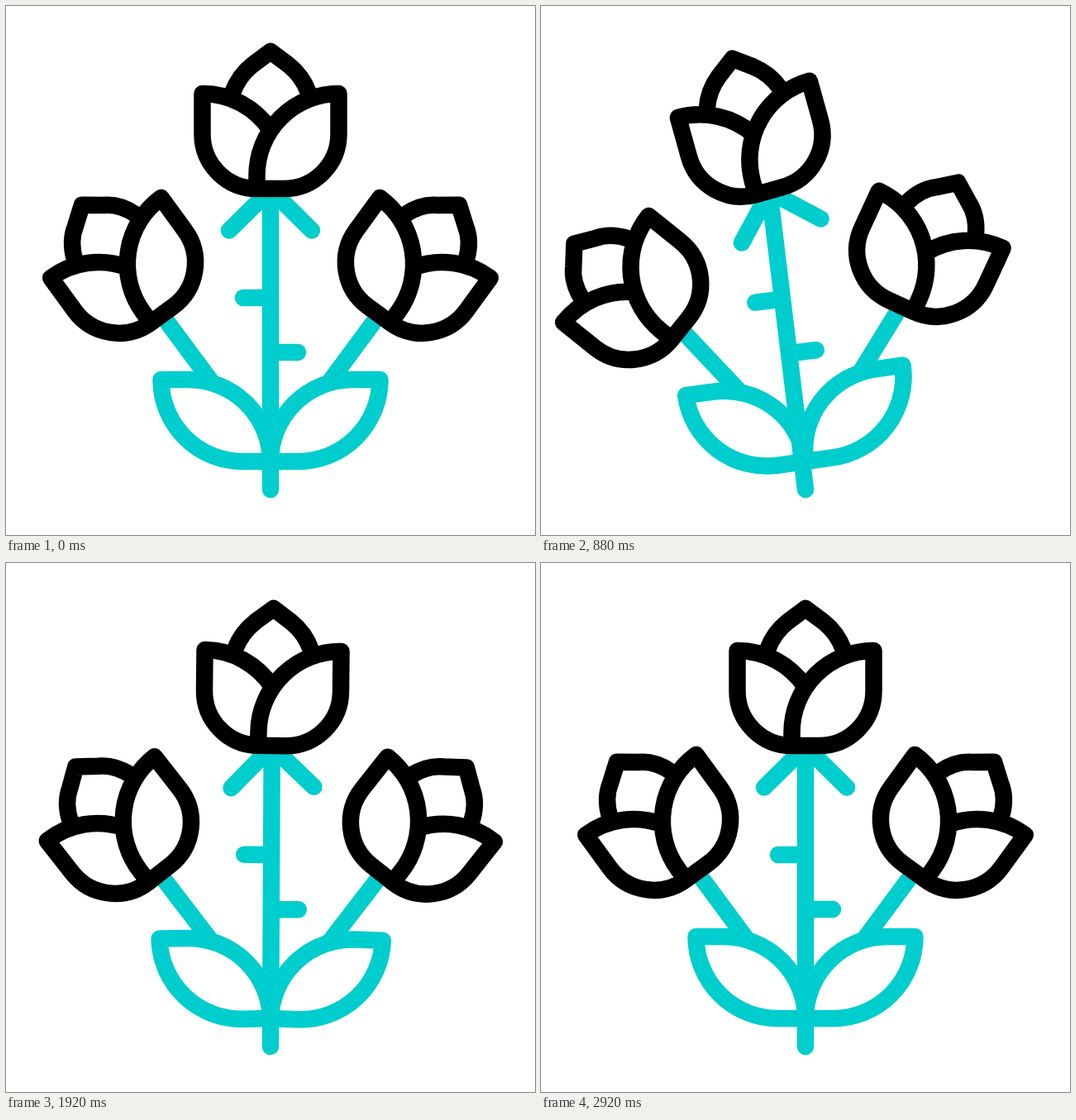
An HTML page with a canvas that plays this animation: 640 px wide and 640 px high, repeating every 3.08 s.

```html
<!DOCTYPE html>
<html lang="en">
<head>
<meta charset="utf-8">
<title>Swaying flowers</title>
<style>
  html, body { margin: 0; width: 100%; height: 100%; overflow: hidden; background: #fff; }
  canvas { display: block; width: 100vw; height: 100vh; }
</style>
</head>
<body>
<canvas id="stage"></canvas>
<script>
const LOOP = 3080, STEP = 40, LAST = 73;
const TEAL = '#00cdcd', BLACK = '#000', WHITE = '#fff';

// Peak angles in degrees; each swing starts and ends at rest.
const STEM = [0, 7.2, -7.2, 3.05, -3.05, 1.2, -0.15, 0];
const HEAD = [0, 9, -9, 3.85, -3.85, 1.5, -0.2, 0];
const SEPAL = [0, 10, -10, 4.8, -4.8, 1, -0.3, 0];
const LEAF = [0, 10, -10, 5, -2.8, 2, 0];

const canvas = document.getElementById('stage');
const ctx = canvas.getContext('2d');
const scale = window.devicePixelRatio || 1;
canvas.width = canvas.height = 640 * scale;

// Flower of the given height with its base at the origin
function bloom(height) {
  const shoulder = 16 - height;
  return new Path2D(
    'M-82.5 -115 V-66 A66 66 0 0 0 -16.5 0 H16.5 A66 66 0 0 0 82.5 -66 V-115' +
    'A99 99 0 0 0 -16.5 -16 V0' +
    'M-82.5 -115 A99 99 0 0 1 0 -70.7' +
    `M-46 -116 C-41 -130 -33 -141 -21.5 ${shoulder} L0 ${-height}` +
    `L21.5 ${shoulder} C33 -141 41 -130 46 -116`);
}

// Right-hand leaf with its base at the origin
const leaf = new Path2D('M0 0 H33 A99 99 0 0 0 132.5 -99 H99 A99 99 0 0 0 0 0 Z');
const trunk = new Path2D('M0 0 V-363 M-33 -232 H0 M0 -166 H33');
const sideStem = new Path2D('M0 0 L131.5 -177.5');
const sepals = new Path2D('M-50 49.5 L0 0 L50 49.5');
const tallBloom = bloom(166), sideBloom = bloom(164.2);

// Damped swing: first peak after 9 steps, then one every 10
function swing(step, delay, peaks) {
  const tau = step - delay;
  if (tau <= 0) return 0;
  const i = tau < 9 ? 0 : 1 + Math.floor((tau - 9) / 10);
  if (i >= peaks.length - 1) return 0;
  const u = i === 0 ? tau / 9 : (tau - 9) % 10 / 10;
  return peaks[i] + (peaks[i + 1] - peaks[i]) * u * u * (3 - 2 * u);
}

function at(x, y, deg, draw, flip = 1) {
  ctx.save();
  ctx.translate(x, y);
  ctx.rotate(deg * Math.PI / 180);
  ctx.scale(flip, 1);
  draw();
  ctx.restore();
}

function line(path, color) {
  ctx.strokeStyle = color;
  ctx.stroke(path);
}

function drawLeaf() {
  ctx.fillStyle = WHITE;
  ctx.fill(leaf);
  line(leaf, TEAL);
}

const flowers = [
  { y: 551, side: 1, delay: 0, jx: 131.5, jy: -177.5, path: sideBloom },
  { y: 551, side: -1, delay: 4, jx: -131.5, jy: -177.5, path: sideBloom },
  { y: 585, side: 0, delay: 2, jx: 0, jy: -364, path: tallBloom }
];

function drawBloom(f, step) {
  const sway = swing(step, f.delay, STEM);
  const nod = swing(step, f.delay, HEAD);
  at(320, f.y, sway, () =>
    at(f.jx, f.jy, nod + 36 * f.side, () => line(f.path, BLACK), f.side > 0 ? -1 : 1));
}

function render(step) {
  ctx.setTransform(scale, 0, 0, scale, 0, 0);
  ctx.fillStyle = WHITE;
  ctx.fillRect(0, 0, 640, 640);
  ctx.lineWidth = 20.5;
  ctx.lineCap = ctx.lineJoin = 'round';

  for (const f of flowers) {
    if (f.side) at(320, f.y, swing(step, f.delay, STEM), () => line(sideStem, TEAL), f.side);
  }
  at(320, 551, -swing(step, 11, LEAF), drawLeaf);
  at(320, 551, swing(step, 5, LEAF), drawLeaf, -1);

  at(320, 585, swing(step, 2, STEM), () => {
    line(trunk, TEAL);
    at(0, -363, swing(step, 3, SEPAL), () => line(sepals, TEAL));
  });

  for (const f of flowers) drawBloom(f, step);
}

const start = performance.now();
function tick() {
  const t = (performance.now() - start) % LOOP;
  render(Math.min(LAST, Math.floor(t / STEP)));
  requestAnimationFrame(tick);
}
tick();
</script>
</body>
</html>
```
